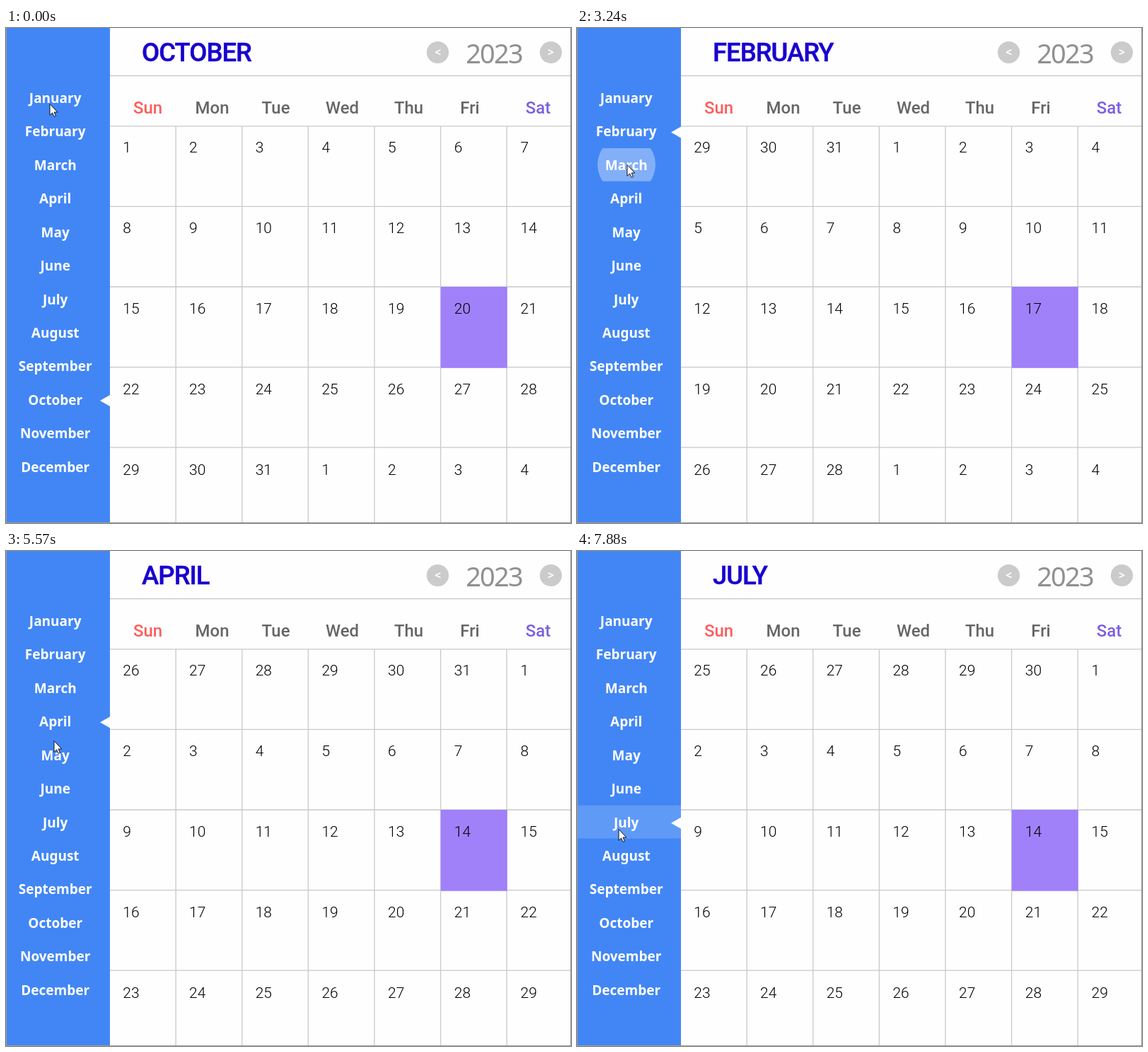
An HTML page that plays this animation: 799 px wide and 700 px high, repeating every 8000 ms.

```html
<!DOCTYPE html>
<html lang="en">
<head>
<meta charset="utf-8">
<title>Calendar</title>
<style>
html, body { margin: 0; width: 100%; height: 100%; overflow: hidden; background: #fefefe; }
svg { display: block; width: 799px; height: 700px; }
text { white-space: pre; }
.month { font: 700 19px "Noto Sans", "Open Sans", sans-serif; fill: #fff; text-anchor: middle; }
.title { font: 500 36.5px Roboto, sans-serif; letter-spacing: -1px; fill: #1800cf; stroke: #1800cf; stroke-width: .4; }
.year { font: 400 38px "Noto Sans", "Open Sans", sans-serif; letter-spacing: -1.8px; fill: #909090; text-anchor: middle; }
.nav { font: 700 16px "Noto Sans", sans-serif; fill: #fff; text-anchor: middle; }
.weekday { font: 500 24px Roboto, sans-serif; fill: #666; text-anchor: middle; }
.date { font: 300 21px Roboto, sans-serif; fill: #000; }
.line { stroke: #c9c9c9; stroke-width: 1.3; }
.edge { stroke: #9b9b9b; stroke-width: 1; }
</style>
</head>
<body>
<svg id="stage" viewBox="0 0 799 700" xmlns="http://www.w3.org/2000/svg"></svg>
<script>
const LOOP = 8000;
const STEP = 135; // the screen refreshes once per step
const MONTHS = ["January", "February", "March", "April", "May", "June", "July",
  "August", "September", "October", "November", "December"];
const WEEKDAYS = { Sun: 200.5, Mon: 291.5, Tue: 381.5, Wed: 475.5, Thu: 569.5, Fri: 656, Sat: 752.5 };
const OCTOBER = 9;

// Clicks on January, February, ...: time and pointer position
const CLICKS = [
  { at: 602, x: 61, y: 107 }, { at: 1765, x: 68, y: 152 }, { at: 3103, x: 71, y: 193 },
  { at: 4355, x: 62, y: 239 }, { at: 5965, x: 72, y: 290 }, { at: 6660, x: 72, y: 338 },
  { at: 7470, x: 59, y: 393 }
];
const HOME = { x: 62, y: 107 };

const stage = document.getElementById("stage");

function set(node, attrs) {
  for (const key in attrs) node.setAttribute(key, attrs[key]);
  return node;
}
function add(tag, attrs, content = "", parent = stage) {
  const node = set(document.createElementNS("http://www.w3.org/2000/svg", tag), attrs);
  node.textContent = content;
  return parent.appendChild(node);
}
const line = (x1, y1, x2, y2, cls = "line") => add("line", { x1, y1, x2, y2, class: cls });
const rowTop = i => 75 + 47.45 * i;

add("rect", { width: 799, height: 700, fill: "#fefefe" });
add("rect", { x: 1, width: 146, height: 700, fill: "#4286f5" });

const clip = add("clipPath", { id: "row" });
const clipRect = add("rect", { x: 1, width: 146, height: 46.8 }, "", clip);
const ripple = add("circle", { cx: 70, fill: "#fff", "clip-path": "url(#row)" });

MONTHS.forEach((name, i) =>
  add("text", { x: 69.7, y: rowTop(i) + 30.8, class: "month" }, name));
const marker = add("path", { d: "M133 0L147 -8V8Z", fill: "#fff" });

const title = add("text", { x: 192, y: 47.3, class: "title" });
add("text", { x: 690, y: 50, class: "year" }, "2023");
for (const [x, sign] of [[610.5, "<"], [770.5, ">"]]) {
  add("circle", { cx: x, cy: 34.5, r: 15.6, fill: "#cbcbcb" });
  add("text", { x, y: 40, class: "nav" }, sign);
}

const weekdayColors = { Sun: "#ff5c5c", Sat: "#7b5fe0" };
for (const name in WEEKDAYS) {
  const label = add("text", { x: WEEKDAYS[name], y: 121, class: "weekday" }, name);
  label.style.fill = weekdayColors[name] || "";
}

line(147, 67.5, 799, 67.5);
for (let row = 0; row < 5; row++) {
  const y = 138.8 + 113.6 * row;
  line(147, y, 799, y);
}
for (let col = 1; col < 7; col++) {
  const x = 146.6 + 93.6 * col;
  line(x, 139, x, 699);
}
add("rect", { x: 614.8, y: 366, width: 94, height: 114.8, fill: "#a081fa" });

const dates = Array.from({ length: 35 }, (_, i) => add("text", {
  x: 165.3 + 93.7 * (i % 7), y: 176.4 + 113.8 * Math.floor(i / 7), class: "date"
}));

line(0.5, 0, 0.5, 700, "edge");
line(798.5, 0, 798.5, 700, "edge");
line(0, 699.5, 799, 699.5, "edge");

const pointer = add("path", {
  d: "M0 .5V16.3L3.6 12.9 6.1 18.4 8.5 17.4 6.1 12H10.9Z",
  fill: "#fff", stroke: "#111", "stroke-width": 1
});

function showMonth(month) {
  title.textContent = MONTHS[month].toUpperCase();
  set(marker, { transform: `translate(0 ${rowTop(month) + 25})` });
  const offset = new Date(2023, month, 1).getDay();
  dates.forEach((node, i) => {
    node.textContent = new Date(2023, month, 1 + i - offset).getDate();
  });
}

const stepsSince = (time, from) => Math.floor((time - from) / STEP);

// Grows for three steps, fills the row on release, then fades out
function showRipple(row, step) {
  const released = step >= 3;
  set(clipRect, { y: rowTop(row) });
  set(ripple, {
    cy: rowTop(row) + 23.4,
    r: released ? 90 : 8 + 33 * step,
    "fill-opacity": released ? Math.max(0, 0.16 - 0.09 * (step - 3)) : 0.34
  });
}

// Eases to each row in four steps, arriving as the click begins
function showPointer(time) {
  let { x, y } = HOME;
  for (const click of CLICKS) {
    const step = stepsSince(time, click.at - 3 * STEP) + 1;
    const progress = Math.min(Math.max(step / 4, 0), 1);
    const eased = 1 - (1 - progress) ** 3;
    x += (click.x - x) * eased;
    y += (click.y - y) * eased;
  }
  set(pointer, { transform: `translate(${Math.round(x)} ${Math.round(y)})` });
}

function draw(time) {
  const row = CLICKS.filter(click => click.at <= time).length - 1;
  const step = row < 0 ? 0 : stepsSince(time, CLICKS[row].at);
  const selected = step >= 3 ? row : row - 1;
  showMonth(selected < 0 ? OCTOBER : selected);
  if (row < 0) set(ripple, { r: 0 });
  else showRipple(row, step);
  showPointer(time);
}

const start = performance.now();
function frame() {
  draw((performance.now() - start) % LOOP);
  requestAnimationFrame(frame);
}
frame();
</script>
</body>
</html>
```
